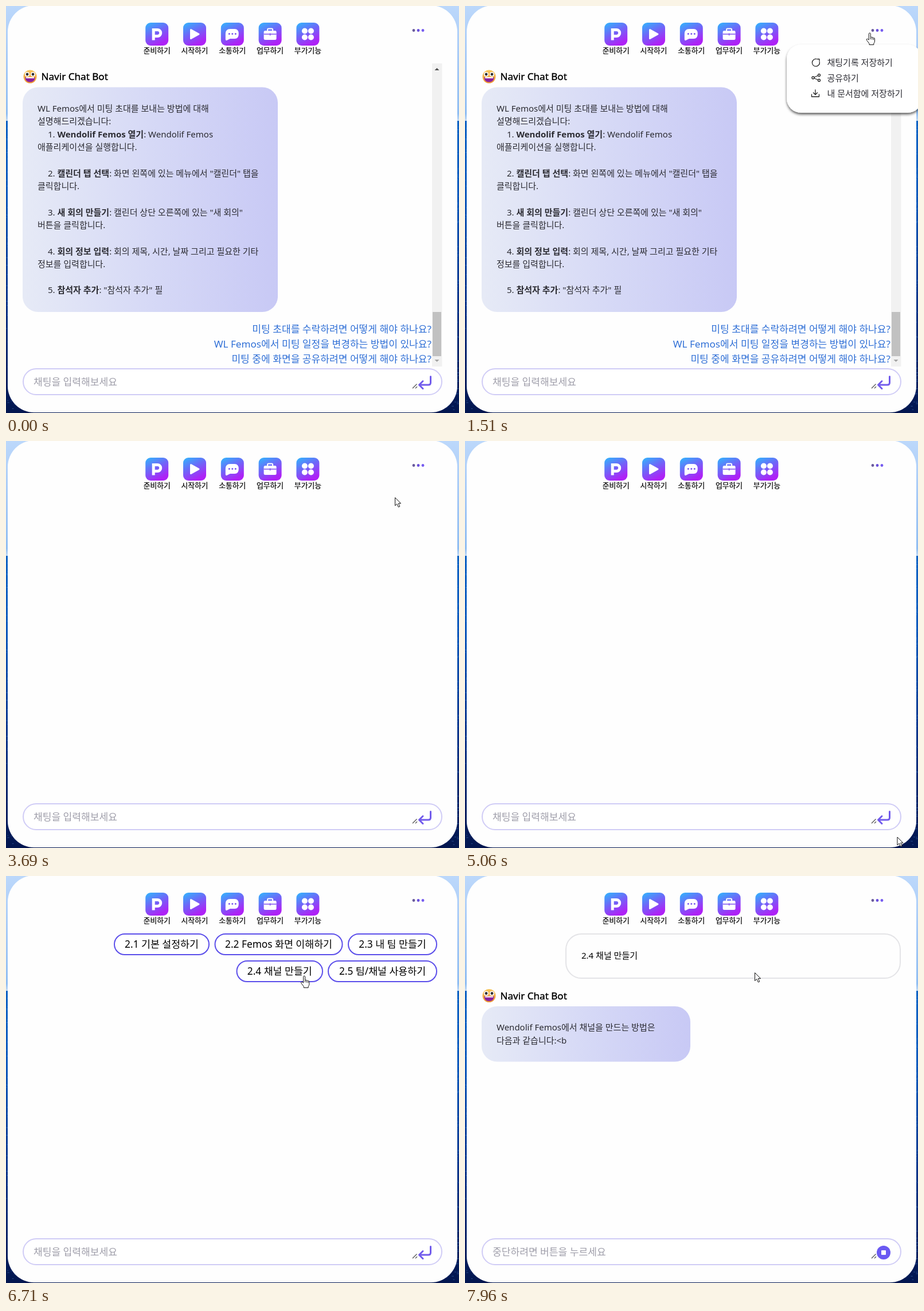
An HTML page for the animation above (8000 ms loop, 790x709 px).

```html
<!DOCTYPE html>
<html lang="ko">
<head>
<meta charset="utf-8">
<title>Chat</title>
<style>
html, body { margin: 0; width: 100%; height: 100%; overflow: hidden; }
svg { display: block; width: 100%; height: 100%; font: 300 15px 'Noto Sans', 'Noto Sans CJK KR', 'Noto Sans CJK', sans-serif; }
text { white-space: pre; fill: #2b2b32; }
.label { font-size: 12.8px; font-weight: 500; text-anchor: middle; fill: #000; stroke: #000; stroke-width: .2; }
.title { font-size: 17.1px; font-weight: 500; fill: #000; stroke: #000; stroke-width: .4; }
.link { font-size: 17.1px; fill: #2f6fd6; text-anchor: end; }
.hint { font-size: 17.1px; fill: #9f9eaa; }
.pill { font-size: 17.3px; font-weight: 400; text-anchor: middle; fill: #000; }
.line { fill: none; stroke-linecap: round; stroke-linejoin: round; }
.strong { font-weight: 700; }
</style>
</head>
<body>
<svg id="stage" viewBox="0 0 790 709" preserveAspectRatio="none"></svg>
<script>
const LOOP = 8000;
const stage = document.getElementById('stage');

const text = (x, y, content, attrs = '') => `<text x="${x}" y="${y}" ${attrs}>${content}</text>`;
const box = (x, y, w, h, r, attrs) => `<rect x="${x}" y="${y}" width="${w}" height="${h}" rx="${r}" ${attrs}/>`;
const dot = (x, y, r, fill) => `<circle cx="${x}" cy="${y}" r="${r}" fill="${fill}"/>`;
const gradient = (id, dir, ...stops) => `<linearGradient id="${id}" ${dir}>${stops.map(([at, color]) =>
  `<stop offset="${at}" stop-color="${color}"/>`).join('')}</linearGradient>`;

function backdrop() {
  let seed = 7, glints = '';
  const random = () => (seed = seed * 16807 % 2147483647) / 2147483647;
  for (let i = 0; i < 500; i++) {
    const side = random() < .5 ? 0 : 765, y = 205 + random() * 504;
    glints += `M${(side + random() * 24).toFixed(1)} ${y.toFixed(1)}h${(1 + random() * 3).toFixed(1)}`;
  }
  return box(0, 0, 790, 204, 0, 'fill="url(#sky)"') + box(0, 200, 790, 509, 0, 'fill="url(#sea)"') +
    `<path d="${glints}" stroke="#5c93dc" stroke-opacity=".4"/>` +
    box(3, -1, 784, 709, 46, 'fill="#fefefe"');
}

function menuIcons() {
  const glyphs = [
    ['준비하기', '<path d="M14 30.5V12.5h7a5.5 5.5 0 0 1 0 11H14" fill="none" stroke="#fff" stroke-width="5"/>'],
    ['시작하기', '<path d="M13.5 12.5L27 20L13.5 27.5z" fill="#fff" stroke="#fff" stroke-width="3" stroke-linejoin="round"/>'],
    ['소통하기', '<path d="M16 11h8q7 0 7 8.500t-7 8.500h-8l-6 3q-2 .5-2-2v-9.500q0-8.500 8-8.500z" fill="#fff"/>' +
      [14.5, 20, 25.5].map(x => dot(x, 19.5, 1.5, '#7a55f0')).join('')],
    ['업무하기', box(15.5, 10.5, 9, 6, 1.5, 'fill="none" stroke="#fff" stroke-width="2"') +
      box(9, 14, 22, 16, 2.5, 'fill="#fff"') +
      '<path d="M9 20h22M20 18.500v4" stroke="#8050f0" stroke-width="1.5"/>'],
    ['부가기능', [[14.5, 14.5], [25.5, 14.5], [14.5, 25.5], [25.5, 25.5]].map(([x, y]) => dot(x, y, 5, '#fff')).join('')]
  ];
  return glyphs.map(([name, glyph], i) => `<g id="icon${i}" transform="translate(${243.2 + i * 65.8} 29)">` +
    box(0, 0, 40, 40, 9, 'fill="url(#tile)"') + glyph + text(20, 53, name, 'class="label"') + '</g>').join('');
}

const botHeader = () => dot(42, 123, 11.5, 'url(#face)') +
  [37, 47].map(x => dot(x, 119, 4, '#fff') + dot(x, 119, 2.4, '#333')).join('') +
  '<path d="M33.500 124h17q0 8.500-8.500 8.500t-8.500-8.500z" fill="#8a219c"/><path d="M35 124h14v2H35z" fill="#fff"/>' +
  text(61.5, 129, 'Navir Chat Bot', 'class="title"');

function answer() {
  const step = (n, title, rest) => `  ${n}. <tspan class="strong">${title}</tspan>: ${rest}`;
  const lines = [
    'WL Femos에서 미팅 초대를 보내는 방법에 대해', '설명해드리겠습니다:',
    step(1, 'Wendolif Femos 열기', 'Wendolif Femos'), '애플리케이션을 실행합니다.', '',
    step(2, '캘린더 탭 선택', '화면 왼쪽에 있는 메뉴에서 "캘린더" 탭을'), '클릭합니다.', '',
    step(3, '새 회의 만들기', '캘린더 상단 오른쪽에 있는 "새 회의"'), '버튼을 클릭합니다.', '',
    step(4, '회의 정보 입력', '회의 제목, 시간, 날짜 그리고 필요한 기타'), '정보를 입력합니다.', '',
    step(5, '참석자 추가', '"참석자 추가" 필')
  ];
  const links = ['미팅 초대를 수락하려면 어떻게 해야 하나요?',
    'WL Femos에서 미팅 일정을 변경하는 방법이 있나요?', '미팅 중에 화면을 공유하려면 어떻게 해야 하나요?'];
  return botHeader() + box(29, 141.5, 445, 391.5, 27, 'fill="url(#bubble)"') +
    lines.map((line, i) => text(line.startsWith(' ') ? 73 : 55, 183.5 + i * 22.64, line.trim())).join('') +
    links.map((line, i) => text(742, 569 + i * 26, line, 'class="link"')).join('') +
    box(743, 100, 17.5, 528, 0, 'fill="#f1f1f1"') + box(744, 533, 15, 77, 0, 'fill="#c1c1c1"') +
    '<path d="M747.500 112h8l-4-4z" fill="#505050"/><path d="M747.500 616h8l-4 4z" fill="#a3a3a3"/>';
}

const pills = () => [
  [189, 101, 165, '2.1 기본 설정하기'], [364.5, 101, 222, '2.2 Femos 화면 이해하기'], [597, 101, 154, '2.3 내 팀 만들기'],
  [402.5, 148, 149.5, '2.4 채널 만들기'], [562, 148, 189, '2.5 팀/채널 사용하기']
].map(([x, y, w, name]) => box(x, y, w, 36, 18, 'fill="#fff" stroke="#5b4eea" stroke-width="2"') +
  text(x + w / 2, y + 24, name, 'class="pill"')).join('');

const inputBar = () => box(30, 632, 730, 45, 22.5, 'fill="#fff" stroke="#d0ccf6" stroke-width="2"') +
  '<text id="hint" x="48" y="660.5" class="hint"></text>' +
  '<path d="M709 666l7.500-7.500M714 666l3-3" stroke="#555" stroke-width="1.300"/>' +
  '<path id="enter" class="line" d="M740.500 645.500V656q0 4-4 4H721M727 653.500l-6.500 6.500l6.500 6.500" stroke="#725cec" stroke-width="3"/>' +
  `<g id="stop">${dot(730, 656, 12, '#6a59f2')}${box(726, 652, 8, 8, 1, 'fill="#fff"')}</g>`;

const dropdown = () => box(561, 67, 236, 119, 25, 'fill="#fff" filter="url(#shadow)"') +
  `<g class="line" stroke="#222" stroke-width="1.300">
    <path d="M613 92.300a6.500 6.500 0 1 0 5.300 5.200M614.500 92.500h3.500v3.500"/>
    <path d="M607 125l10.500-4.500M607 125l10.500 4.500"/>
    <path d="M611 146v8M607.500 151l3.500 3.500l3.500-3.500M604.500 154v4h13v-4"/>
    <circle cx="607" cy="125" r="2" fill="#fff"/><circle cx="617.500" cy="120.500" r="2" fill="#fff"/><circle cx="617.500" cy="129.500" r="2" fill="#fff"/>
  </g>` +
  ['채팅기록 저장하기', '공유하기', '내 문서함에 저장하기'].map((name, i) => text(631.5, 103.500 + i * 27.2, name)).join('');

stage.innerHTML = `<defs>
  ${gradient('sky', 'x2="0" y2="1"', [0, '#bcd8fb'], [.5, '#a4c8f6'], [.92, '#8fbdf2'], [1, '#d3e5f8'])}
  ${gradient('sea', 'x2="0" y2="1"', [0, '#0b62c4'], [.25, '#0758bd'], [.6, '#05348c'], [1, '#03164f'])}
  ${gradient('tile', 'x2=".5" y2="1"', [0, '#2fb8fd'], [.5, '#6d68f8'], [1, '#ae22f6'])}
  ${gradient('bubble', 'x2="1" y2="0"', [0, '#e6eaf6'], [.5, '#d6d9f6'], [1, '#c8c9f5'])}
  ${gradient('face', 'x2="0" y2="1"', [0, '#f6c65a'], [1, '#ee9433'])}
  <filter id="shadow" x="-10%" y="-10%" width="120%" height="130%"><feDropShadow dx="0" dy="3" stdDeviation="2" flood-opacity=".6"/></filter>
</defs>
${backdrop()}${menuIcons()}
${dot(711, 42.5, 2.4, '#695a9c')}${dot(719, 42.5, 2.4, '#6a50dc')}${dot(727, 42.5, 2.4, '#765cf0')}
<g id="answer">${answer()}</g>
<g id="pills">${pills()}</g>
<g id="question">${box(176, 101, 583, 77, 27, 'fill="#fefefe" stroke="#e4e4e7" stroke-width="2"')}${text(203, 144, '2.4 채널 만들기', 'font-weight="400" style="fill:#000"')}</g>
<g id="reply" transform="translate(0 85.500)">${botHeader()}
  <rect id="replyBox" x="29" y="141.500" rx="27" fill="url(#bubble)"/>
  <text id="reply0" x="55" y="183.500"></text><text id="reply1" x="55" y="206.100"></text></g>
${inputBar()}
<g id="menu">${dropdown()}</g>
<g id="cursor" fill="#fff" stroke="#111" stroke-linejoin="round">
  <path id="arrow" d="M.5 .5V14.500L3.800 11.500L6.300 17L8.700 16L6.300 10.600H10.500z"/>
  <path id="hand" d="M-1.700 12V1.500a1.500 1.500 0 0 1 3 0V7.500q1.300-1 2.700 .4q1.500-.6 2.500 .8q2-.4 2 1.600V14q0 3-1.700 4V20.500H-1V18.500L-5.500 12.500q-1-2 .8-2.200q1.400 0 3 1.700zM1.300 8v3M4 8.500v3M6.500 9.500v2.500"/>
</g>`;

const part = id => document.getElementById(id);
const show = (id, on) => part(id).setAttribute('display', on ? 'inline' : 'none');
const within = (t, ...spans) => spans.some(([from, to]) => t >= from && t < to);
const swing = (t, from, to) => .5 - Math.cos(Math.PI * Math.min(1, Math.max(0, (t - from) / (to - from)))) / 2;

// time, x, y of the pointer tip
const route = [
  [200, 572, 702], [440, 655, 400], [700, 724, 110], [840, 706, 47], [1660, 706, 47],
  [1980, 590, 108], [2180, 630, 116], [2430, 679, 98], [3690, 679, 98],
  [3960, 424, 130], [4200, 560, 420], [4470, 733, 679], [5050, 733, 679], [5060, 754, 691],
  [5300, 620, 330], [5600, 327, 46], [6160, 327, 46], [6420, 480, 130], [6600, 545, 184], [6780, 505, 168], [8000, 505, 168]
];
const replyLines = ['Wendolif Femos에서 채널을 만드는 방법은', '다음과 같습니다:<b'];

function pointerAt(t) {
  const i = Math.max(1, route.findIndex(key => key[0] > t));
  const [[t0, x0, y0], [t1, x1, y1]] = [route[i - 1], route[i]];
  const k = (t - t0) / (t1 - t0);
  return [x0 + (x1 - x0) * k, y0 + (y1 - y0) * k];
}

function typeReply(t) {
  const total = replyLines.join('').length;
  const typed = Math.round(total * Math.min(1, Math.floor((t - 7540) / 70) / 6));
  const wrapped = typed > replyLines[0].length;
  part('reply0').textContent = replyLines[0].slice(0, typed);
  part('reply1').textContent = replyLines[1].slice(0, Math.max(0, typed - replyLines[0].length));
  show('replyBox', typed > 0);
  part('replyBox').setAttribute('width', wrapped ? 364 : Math.min(364, part('reply0').getComputedTextLength() + 52));
  part('replyBox').setAttribute('height', wrapped ? 96.5 : 74);
}

function draw(now) {
  const t = now % LOOP, replying = t >= 7540;
  show('answer', t < 3220);
  show('pills', within(t, [5760, 7320]));
  show('question', t >= 7050);
  part('question').setAttribute('transform', `translate(0 ${t < 7320 ? 111 : 0})`);
  part('icon1').setAttribute('opacity', within(t, [5560, 6220]) ? .62 : 1);
  part('menu').setAttribute('opacity', swing(t, 1000, 1500) - swing(t, 2720, 3010));

  show('reply', replying);
  show('stop', replying);
  show('enter', !replying);
  part('hint').textContent = replying ? '중단하려면 버튼을 누르세요' : '채팅을 입력해보세요';
  if (replying) typeReply(t);

  const hand = within(t, [790, 1720], [2250, 2960], [5560, 6220], [6380, 7320]);
  show('cursor', t >= 200);
  show('hand', hand);
  show('arrow', !hand);
  if (t >= 200) part('cursor').setAttribute('transform', `translate(${pointerAt(t).join(' ')})`);
  requestAnimationFrame(() => draw(performance.now() - start));
}

const start = performance.now();
draw(0);
</script>
</body>
</html>
```
